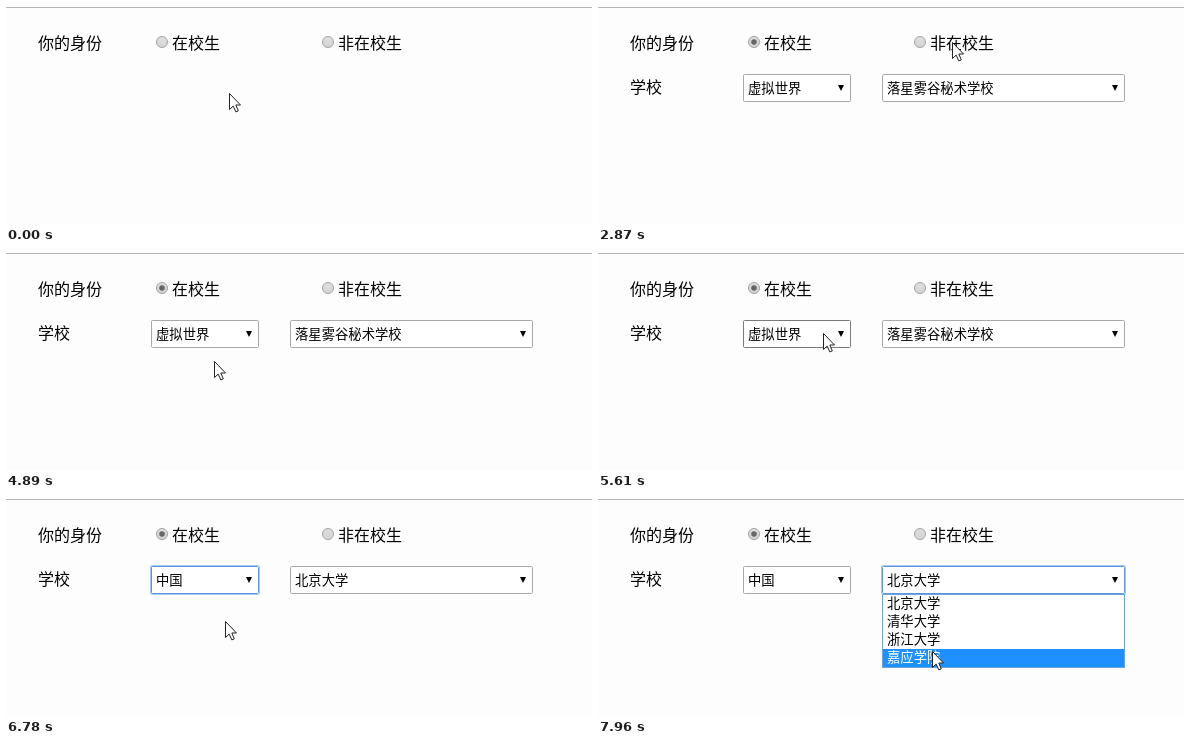
Animation, 586 px wide and 218 px high, one loop 8000 ms. Source, as an HTML page:

```html
<!DOCTYPE html>
<html lang="zh-CN">
<head>
<meta charset="utf-8">
<style>
html, body { margin: 0; width: 100%; height: 100%; overflow: hidden; background: #fdfdfd; }
svg { display: block; }
text { font: 350 16px "Noto Sans CJK SC", "Noto Sans CJK", sans-serif; white-space: pre; }
.small { font-size: 13.333px; }
</style>
</head>
<body>
<svg id="stage" width="586" height="218" viewBox="0 0 586 218"></svg>
<script>
const LOOP = 8000, TICK = 130, MAX_MOVE = 500, ROW = 18;
const PICK_STUDENT = 1680, PICK_WORKER = 3020, PICK_AGAIN = 4350;
const OPEN_AREA = 5760, CLOSE_AREA = 6780, OPEN_SCHOOL = 7400;
const AREAS = ['虚拟世界', '中国', '美国'];
const SCHOOLS = ['北京大学', '清华大学', '浙江大学', '嘉应学院'];

// Places the pointer reaches; it rests until the next move has to begin
const STOPS = [
  { at: 0, x: 223, y: 88 },
  { at: 650, x: 369, y: 40 },
  { at: 1150, x: 206, y: 40 },
  { at: 2300, x: 275, y: 53 },
  { at: 2870, x: 354, y: 37 },
  { at: 3700, x: 270, y: 57 },
  { at: 4200, x: 185, y: 43 },
  { at: 4850, x: 208, y: 110 },
  { at: 5340, x: 246, y: 90 },
  { at: 5610, x: 225, y: 82 },
  { at: 6190, x: 219, y: 124 },
  { at: CLOSE_AREA, x: 219, y: 124 },
  { at: 7250, x: 338, y: 84 },
  { at: 7720, x: 335, y: 157 },
  { at: 7960, x: 334, y: 154 }
];

const smooth = u => u * u * (3 - 2 * u);

function pointerAt(t) {
  const i = STOPS.findIndex(s => s.at > t);
  if (i < 0) return STOPS[STOPS.length - 1];
  const a = STOPS[i - 1], b = STOPS[i];
  const start = Math.max(a.at, b.at - MAX_MOVE);
  const steps = Math.round((b.at - start) / TICK);
  const u = Math.max(0, (t - start) / (b.at - start));
  const k = smooth(Math.floor(u * steps) / steps);
  const mix = (p, q) => Math.round(p + (q - p) * k);
  return { x: mix(a.x, b.x), y: mix(a.y, b.y) };
}

const text = (x, y, s, attrs = '') => `<text x="${x}" y="${y}" ${attrs}>${s}</text>`;
const small = (x, y, s, fill = '#000') => text(x, y, s, `class="small" fill="${fill}"`);
const box = (x, y, w, h, stroke, rx = 0) =>
  `<rect x="${x + .5}" y="${y + .5}" width="${w - 1}" height="${h - 1}" rx="${rx}" fill="#fff" stroke="${stroke}"/>`;

function radio(x, label, checked) {
  return `<circle cx="${x}" cy="36" r="5.5" fill="url(#knob)" stroke="#a2a2a2"/>` +
    (checked ? `<circle cx="${x}" cy="36" r="2.8" fill="#666"/>` : '') +
    text(x + 10, 43, label);
}

function select(x, w, value, focused, mouse) {
  const hover = mouse.x >= x && mouse.x < x + w && mouse.y >= 68 && mouse.y < 96;
  const glow = focused ? `<rect x="${x - .5}" y="67.5" width="${w + 1}" height="29" rx="1.5" fill="none" stroke="#a9c8f0"/>` : '';
  return glow + box(x, 68, w, 28, focused ? '#5b93dc' : hover ? '#7b7b7b' : '#a9a9a9', 1) +
    small(x + 5, 87, value) + `<path d="M${x + w - 13} 79h6l-3 6z"/>`;
}

function list(x, w, items, active) {
  return box(x, 96, w, items.length * ROW + 2, '#6aa5de') + items.map((s, i) =>
    (i === active ? `<rect x="${x + 1}" y="${97 + i * ROW}" width="${w - 2}" height="${ROW}" fill="#1e90ff"/>` : '') +
    small(x + 5, 110 + i * ROW, s, i === active ? '#fff' : '#000')).join('');
}

function scene(t) {
  const mouse = pointerAt(t);
  const row = Math.max(0, Math.floor((mouse.y - 97) / ROW));
  const worker = t >= PICK_WORKER && t < PICK_AGAIN;
  const student = t >= PICK_STUDENT && !worker;
  const chosen = t >= CLOSE_AREA;
  let s = `<defs><linearGradient id="knob" x2="0" y2="1"><stop stop-color="#e0e0e0"/>
    <stop offset="1" stop-color="#d4d4d4"/></linearGradient></defs>
    <rect width="586" height="218" fill="#fdfdfd"/><rect width="586" height="1" fill="#fff"/>
    <rect y="1" width="586" height="1" fill="#b4b4b4"/>`;
  s += text(32, 43, '你的身份') + radio(156, '在校生', student) + radio(322, '非在校生', worker);
  if (worker) s += text(32, 87, '就业单位') + box(145, 68, 380, 30, '#a9a9a9');
  if (student) {
    s += text(32, 87, '学校') +
      select(145, 108, AREAS[chosen ? 1 : 0], t >= OPEN_AREA && t < OPEN_SCHOOL, mouse) +
      select(284, 243, chosen ? SCHOOLS[0] : '落星雾谷秘术学校', t >= OPEN_SCHOOL, mouse);
    if (t >= OPEN_AREA && !chosen) s += list(145, 108, AREAS, row);
    if (t >= OPEN_SCHOOL) s += list(284, 243, SCHOOLS, row);
  }
  return s + `<path transform="translate(${mouse.x + .5} ${mouse.y - .5})" fill="#fff" stroke="#222"
    d="M0 0V16L3.7 12.6L6.3 18.4L8.8 17.4L6.3 11.5H11Z"/>`;
}

const stage = document.getElementById('stage');
let shown = '';
function draw() {
  const next = scene(performance.now() % LOOP);
  if (next !== shown) stage.innerHTML = shown = next;
  requestAnimationFrame(draw);
}
draw();
</script>
</body>
</html>
```
